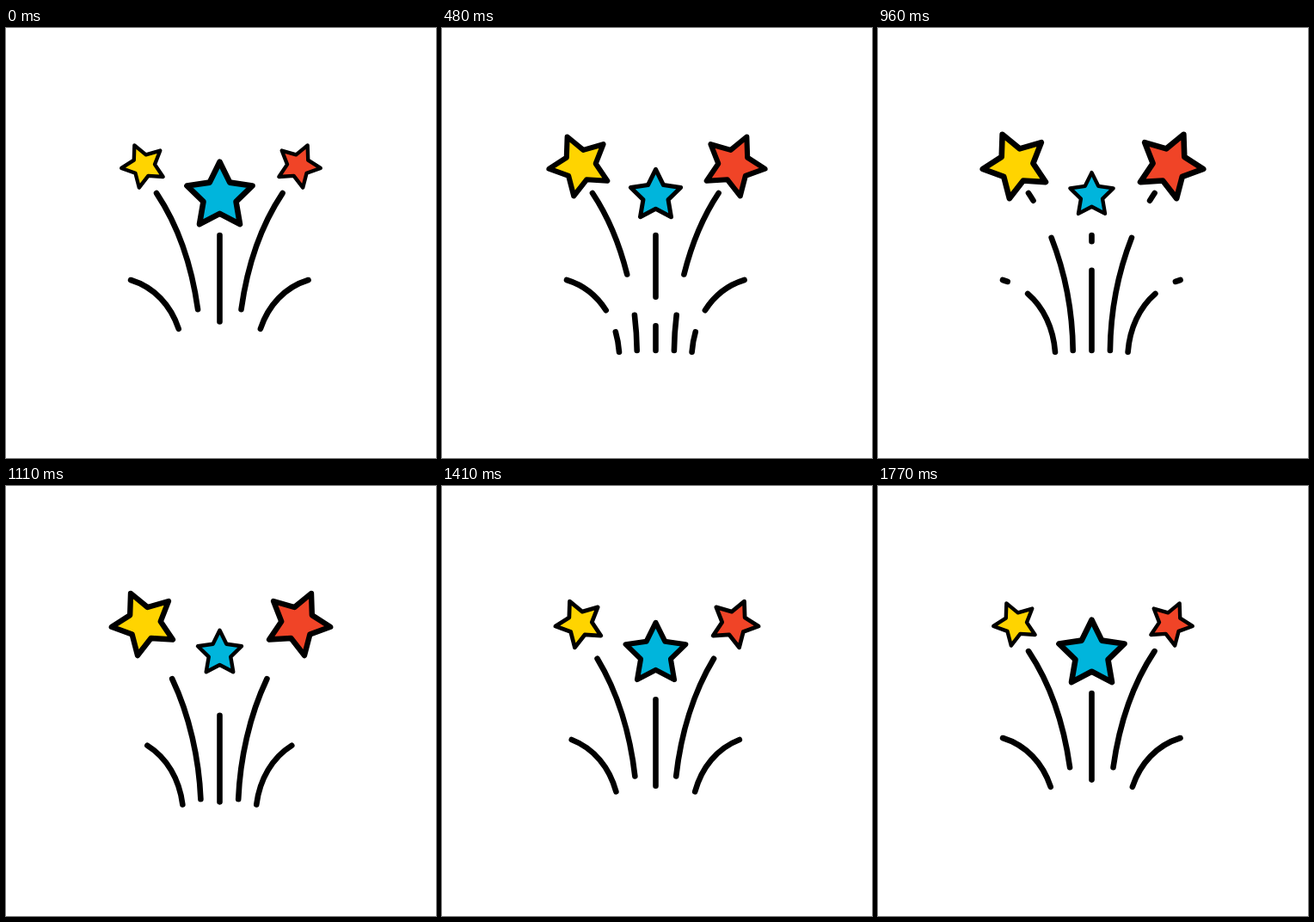
Write an HTML page that moves like this. It is 500 by 500 pixels and loops after 1800 ms.

```html
<!DOCTYPE html>
<html>
<head>
<meta charset="utf-8">
<style>
html, body { margin: 0; height: 100%; overflow: hidden; background: #fff; }
svg { display: block; width: 100vw; height: 100vh; }
g { stroke: #000; stroke-width: 6.6; stroke-linecap: round; stroke-linejoin: round; }
</style>
</head>
<body>
<svg viewBox="0 0 500 500"><g id="art"></g></svg>
<script>
const LOOP = 1800, MIN_SCALE = 0.66;
const art = document.getElementById('art');

function add(tag, attrs) {
  const el = document.createElementNS('http://www.w3.org/2000/svg', tag);
  for (const k in attrs) el.setAttribute(k, attrs[k]);
  return art.appendChild(el);
}

// Easing with control points (a, 0) and (b, 1)
const bezier = (a, b) => x => {
  let lo = 0, hi = 1;
  for (let i = 0; i < 30; i++) {
    const s = (lo + hi) / 2, r = 1 - s;
    if (3 * a * s * r * r + 3 * b * s * s * r + s ** 3 < x) lo = s; else hi = s;
  }
  return lo * lo * (3 - 2 * lo);
};
const flow = bezier(0.366, 0.42), pulse = bezier(0.57, 0.2);

// Trails run from the tip down; a gap of a quarter travels up each one
const inner = 'M175 192C209 243 226 313 226.7 375';
const outer = 'M145 293C181 304 203 337 206 376.7';
const mirror = 'translate(496.6 0) scale(-1 1)';
const trails = [['M248.5 241V375', ''], [inner, ''], [inner, mirror], [outer, ''], [outer, mirror]]
  .map(([d, transform]) => add('path', {
    d, transform, fill: 'none', pathLength: 100, 'stroke-dasharray': '75 25'
  }));

function starPath(cx, cy, radius, turn) {
  const points = [];
  for (let i = 0; i < 10; i++) {
    const a = (turn + i * 36) * Math.PI / 180, r = i % 2 ? radius / 2 : radius;
    points.push([cx + r * Math.sin(a), cy - r * Math.cos(a)]);
  }
  return 'M' + points.join('L') + 'Z';
}

const middle = starPath(0, 3.8, 40, 0), side = starPath(2.2, -1.4, 39.4, -24.3);
const stars = [
  { d: middle, fill: '#00b5dc', x: 248.5, y: 192, flip: 1, from: 1, to: MIN_SCALE, turnAt: 990 },
  { d: side, fill: '#ffd400', x: 158.6, y: 161, flip: 1, from: MIN_SCALE, to: 1, turnAt: 900 },
  { d: side, fill: '#f04427', x: 341.4, y: 161, flip: -1, from: MIN_SCALE, to: 1, turnAt: 900 }
];
for (const s of stars) s.el = add('path', { d: s.d, fill: s.fill });

function draw(now) {
  const t = now % LOOP;
  // The tiny shift keeps a stray round cap off the far end at the start
  const offset = 100 * flow(t / LOOP) - 0.05;
  for (const p of trails) p.setAttribute('stroke-dashoffset', offset);
  for (const { el, x, y, flip, from, to, turnAt } of stars) {
    const p = t < turnAt ? pulse(t / turnAt) : 1 - pulse((t - turnAt) / (LOOP - turnAt));
    const k = from + (to - from) * p;
    el.setAttribute('transform', `translate(${x} ${y}) scale(${k * flip} ${k})`);
  }
}

const start = performance.now();
function tick() {
  draw(performance.now() - start);
  requestAnimationFrame(tick);
}
tick();
</script>
</body>
</html>
```
